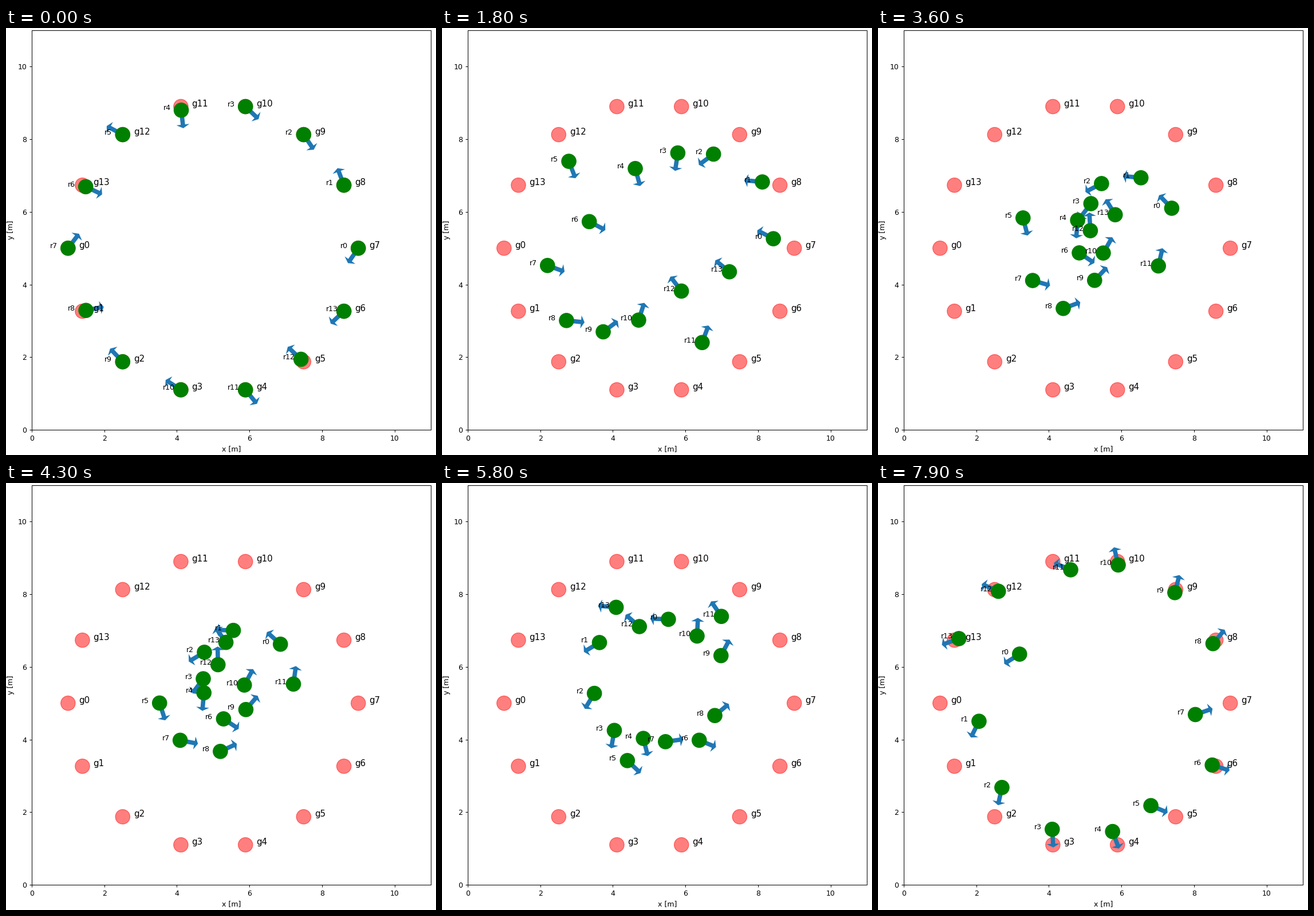
A matplotlib script for the animation above (8000 ms loop, 751x745 px).

```python
import numpy as np
import matplotlib.pyplot as plt
from matplotlib.animation import FuncAnimation
from matplotlib.patches import Circle, Polygon

W, H, DPI = 751, 745, 90
FRAMES, INTERVAL = 80, 100
COUNT, CENTER, RING, RADIUS = 14, 5, 4, 0.2
VIA_TIMES = (2.5, 5.8)
CRUISE, EARLIEST = 1.3, 8.0      # m/s, soonest arrival in s
TURN_RATE = np.radians(100)      # per second
FIRST_STEP = 0.1

# Arrow outline pointing along +x
ARROW = np.array([(0, .06), (0, -.06), (.4, -.06), (.4, -.18),
                  (.5, 0), (.4, .18), (.4, .06)])

# Starting direction in degrees and two points passed on the way
ROUTES = [
    (-125, (8.08, 5.46), (5.53, 7.31)),
    (111, (7.72, 6.84), (3.63, 6.67)),
    (-56, (6.36, 7.29), (3.49, 5.27)),
    (-44, (5.66, 7.07), (4.04, 4.25)),
    (-84, (4.76, 6.59), (4.84, 4.03)),
    (152, (2.98, 6.90), (4.40, 3.42)),
    (-25, (4.01, 5.38), (6.38, 3.98)),
    (53, (2.74, 4.35), (5.45, 3.94)),
    (13, (3.28, 3.03), (6.81, 4.66)),
    (134, (4.31, 3.17), (6.98, 6.31)),
    (147, (4.98, 3.81), (6.32, 6.85)),
    (-50, (6.68, 3.13), (6.99, 7.39)),
    (137, (5.42, 4.50), (4.73, 7.11)),
    (-137, (6.61, 4.87), (4.09, 7.64)),
]


def ring_point(i):
    return CENTER + RING * unit(2 * np.pi * i / COUNT)


def goal_point(i):
    return ring_point(i + COUNT // 2)


def unit(angle):
    return np.array([np.cos(angle), np.sin(angle)])


def direction(v):
    return np.arctan2(v[1], v[0])


def wrap(angle):
    return (angle + np.pi) % (2 * np.pi) - np.pi


class Robot:
    """Crosses the ring to the far side, first turning onto its path."""

    def __init__(self, ax, i, degrees, *vias):
        start, goal = ring_point(i), goal_point(i)
        heading = np.radians(degrees)
        self.error = wrap(heading - direction(vias[0] - start))
        if abs(self.error) < np.pi / 6:
            start = start + FIRST_STEP * unit(heading)
        last_leg = np.hypot(*(goal - vias[-1]))
        arrival = max(EARLIEST, VIA_TIMES[-1] + last_leg / CRUISE)

        self.times = np.array([0, *VIA_TIMES, arrival])
        self.keys = np.array([start, *vias, goal])
        self.vel = np.gradient(self.keys, self.times, axis=0)
        self.vel[0] *= np.cos(self.error / 2) ** 2

        self.arrow = ax.add_patch(Polygon(ARROW, closed=True))
        self.body = ax.add_patch(Circle(start, RADIUS, color="g", zorder=3))
        self.label = ax.text(0, 0, f"r{i}", fontsize=10, zorder=4)

    def position(self, t):
        """Cubic Hermite curve through the key points."""
        k = np.searchsorted(self.times[1:-1], t, side="right")
        h = self.times[k + 1] - self.times[k]
        u = (t - self.times[k]) / h
        return ((1 + 2 * u) * (1 - u) ** 2 * self.keys[k]
                + u * (1 - u) ** 2 * h * self.vel[k]
                + u * u * (3 - 2 * u) * self.keys[k + 1]
                + u * u * (u - 1) * h * self.vel[k + 1])

    def heading(self, t):
        ahead = self.position(t + 0.05) - self.position(max(t - 0.05, 0))
        left = max(abs(self.error) - TURN_RATE * t, 0)
        return direction(ahead) + np.sign(self.error) * left

    def move(self, t):
        p = self.position(t)
        c, s = unit(self.heading(t))
        self.body.center = p
        self.arrow.set_xy(p + ARROW @ np.array([[c, s], [-s, c]]))
        self.label.set_position((p[0] - 0.5, p[1]))


plt.rcParams["font.family"] = "DejaVu Sans"
fig = plt.figure(figsize=(W / DPI, H / DPI), dpi=DPI)
ax = fig.add_axes([45 / W, 44 / H, 697 / W, 697 / H])
ax.set(xlim=(0, 11), ylim=(0, 11), xlabel="x [m]", ylabel="y [m]",
       xticks=range(0, 11, 2), yticks=range(0, 11, 2))

for i in range(COUNT):
    x, y = goal_point(i)
    ax.add_patch(Circle((x, y), RADIUS, color="r", alpha=0.5))
    ax.text(x + 0.3, y, f"g{i}", fontsize=12, zorder=4)
robots = [Robot(ax, i, *route) for i, route in enumerate(ROUTES)]


def update(i):
    for robot in robots:
        robot.move(i * INTERVAL / 1000)
    return []


anim = FuncAnimation(fig, update, frames=FRAMES, interval=INTERVAL,
                     repeat=True, repeat_delay=0, blit=False)
plt.show()
```
